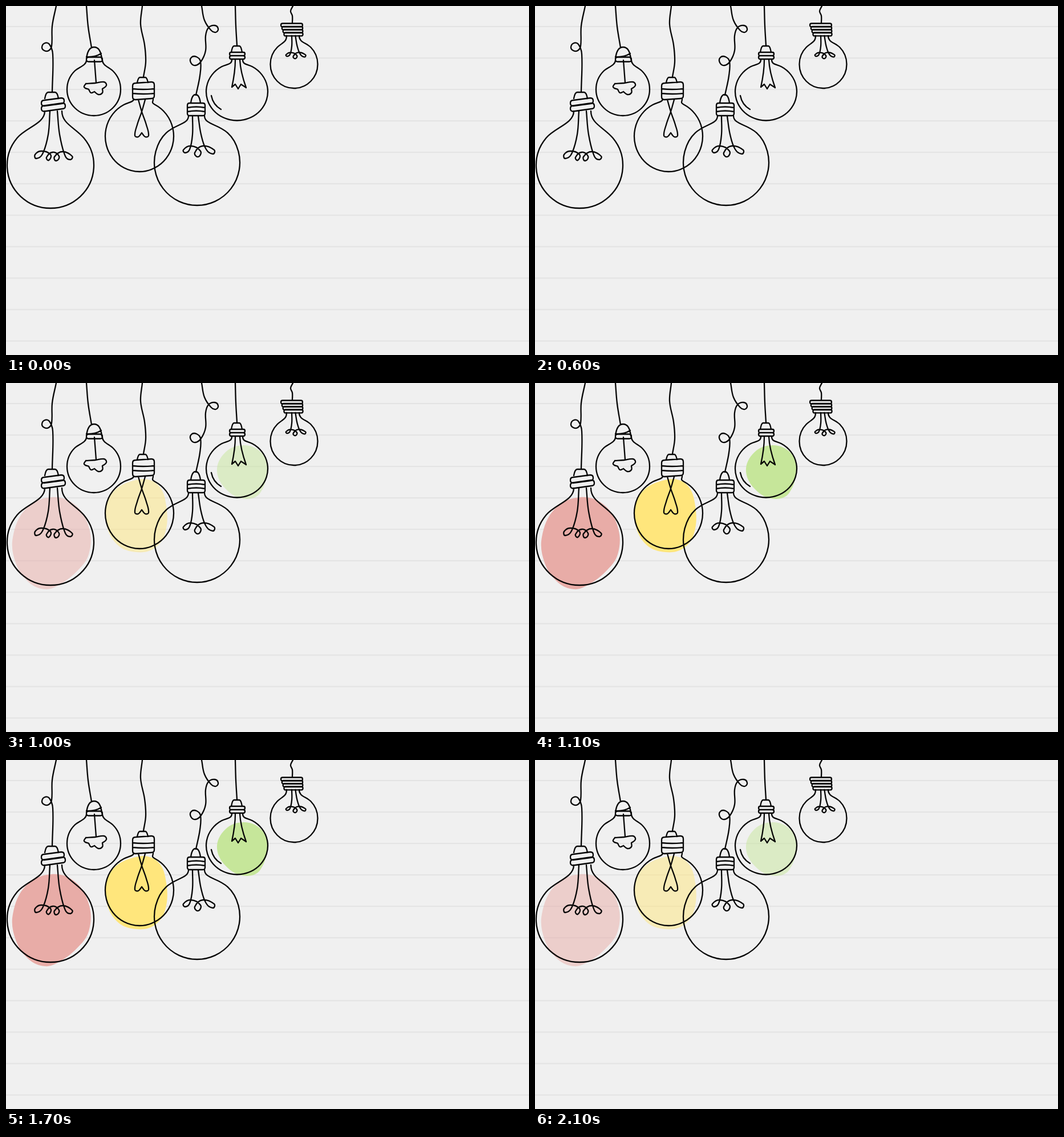
Write an HTML page that moves like this. It is 917x611 px and loops after 2200 ms.

```html
<!DOCTYPE html>
<html lang="en">
<head>
<meta charset="utf-8">
<title>Light bulbs</title>
<style>
  html, body { margin: 0; width: 100%; height: 100%; overflow: hidden; background: #f0f0f0; }
  svg { display: block; width: 100%; height: 100%; }
  #ink { fill: none; stroke: #050505; stroke-width: 2.3; stroke-linecap: round; stroke-linejoin: round; }
  #glow { opacity: 0; animation: glow 2200ms step-end infinite; }
  @keyframes glow {
    0% { opacity: 0; }
    45.4545% { opacity: .5; }
    50% { opacity: 1; }
    95.4545% { opacity: .5; }
    100% { opacity: 0; }
  }
</style>
</head>
<body>
<svg viewBox="0 0 917 611">
  <defs>
    <pattern id="rules" y="35" width="917" height="55.05" patternUnits="userSpaceOnUse">
      <rect width="917" height="2" fill="#e3e3e3"/>
    </pattern>
  </defs>
  <rect width="917" height="611" fill="url(#rules)"/>
  <g id="glow">
    <path id="pink" fill="#e8aca7"/>
    <path id="yellow" fill="#ffe67c"/>
    <path id="green" fill="#c6e69a"/>
  </g>
  <path id="ink"/>
</svg>
<script>
const strokes = [];
const draw = d => strokes.push(d);
const setPath = (id, d) => document.getElementById(id).setAttribute('d', d);

// Smooth curve through flat x, y pairs; handles scale with each segment.
function smooth(coords, closed = false) {
  const pts = [];
  for (let i = 0; i < coords.length; i += 2) pts.push([coords[i], coords[i + 1]]);
  const n = pts.length;
  const at = i => closed ? pts[(i + n) % n] : pts[Math.max(0, Math.min(n - 1, i))];
  const tangent = i => {
    const [a, b] = [at(i - 1), at(i + 1)];
    const len = Math.hypot(b[0] - a[0], b[1] - a[1]) || 1;
    return [(b[0] - a[0]) / len, (b[1] - a[1]) / len];
  };
  let d = `M${pts[0]}`;
  for (let i = 0; i < (closed ? n : n - 1); i++) {
    const p = at(i), q = at(i + 1), t = tangent(i), u = tangent(i + 1);
    const k = Math.hypot(q[0] - p[0], q[1] - p[1]) * .36;
    d += `C${p[0] + t[0] * k},${p[1] + t[1] * k} ${q[0] - u[0] * k},${q[1] - u[1] * k} ${q}`;
  }
  return d;
}
const curve = (...coords) => draw(smooth(coords));

// Elliptical glass, open between its shoulders, flowing into the neck.
function glass({ cx, cy, rx, ry, left, right, top, shoulder, reach, drop }) {
  const a = shoulder * Math.PI / 180;
  const dx = rx * Math.sin(a), y = cy - ry * Math.cos(a);
  const tx = rx * Math.cos(a), ty = ry * Math.sin(a), k = reach / Math.hypot(tx, ty);
  draw(`M${left},${top}C${left},${top + drop} ${cx - dx + tx * k},${y - ty * k} ${cx - dx},${y}` +
    `A${rx},${ry} 0 1 0 ${cx + dx},${y}` +
    `C${cx + dx - tx * k},${y - ty * k} ${right},${top + drop} ${right},${top}`);
}

// Rounded cap ring whose right end is raised by rise.
function ring(x, y, w, h, r, rise = 0) {
  const run = w - 2 * r, side = h - 2 * r;
  draw(`M${x + r},${y}l${run},${-rise}q${r},0 ${r},${r}v${side}q0,${r} ${-r},${r}` +
    `l${-run},${rise}q${-r},0 ${-r},${-r}v${-side}q0,${-r} ${r},${-r}z`);
}

function dome(x1, x2, base, top, round) {
  const c = (x2 - x1) * round;
  draw(`M${x1},${base}Q${x1 + 2},${top} ${x1 + c},${top}H${x2 - c}Q${x2 - 2},${top} ${x2},${base}`);
}

const arch = (x1, x2, y, bend) => draw(`M${x1},${y}Q${(x1 + x2) / 2},${y + bend} ${x2},${y}`);

// Large bulb on the left
curve(88,0, 81,35, 80,70, 75,78, 67,78, 63,72, 68,65, 76,67, 82,84, 81,151);
dome(68, 92, 162, 151, .25);
ring(62, 165, 40, 10, 5, 4);
ring(62, 174.5, 42, 10, 5, 4.5);
glass({ cx: 78, cy: 279, rx: 76, ry: 75, left: 68, right: 98, top: 184, shoulder: 50, reach: 24, drop: 22 });
curve(77,184, 74,225, 64,259, 53,267, 51,260, 62,254, 78,260, 75,270, 71,265, 82,256,
  93,263, 88,271, 85,264, 99,255, 116,263, 113,269, 104,263, 94,225, 90,184);

// Bulb with a flower
curve(141,0, 144,36, 150,73);
dome(141, 168, 93, 72, .5);
draw('M141,89Q156,90 167,83');
ring(141, 89.5, 28, 8, 4);
glass({ cx: 154, cy: 146, rx: 47, ry: 46, left: 141, right: 169, top: 95, shoulder: 45, reach: 9, drop: 9 });
draw('M155,95L158,134');
curve(140,136, 156,135, 172,133, 176,139, 169,145);
curve(169,145, 169,152, 162,155, 155,150);
curve(155,150, 149,152, 145,146);
curve(145,146, 137,142, 140,136);

// Bulb with a heart
curve(239,0, 236,32, 243,68, 245,98, 241,124);
dome(230, 249, 134, 125, .25);
ring(222, 135, 38, 29, 5, 2);
arch(222, 259, 145, 2);
arch(222, 260, 153, 2);
glass({ cx: 234, cy: 228, rx: 60, ry: 62, left: 224, right: 258, top: 163, shoulder: 27, reach: 8, drop: 5 });
const heartHalf = [232,164, 238,185, 246,208, 250,227, 244,229, 238,222];
curve(...heartHalf);
curve(...heartHalf.map((v, i) => i % 2 ? v : 476 - v));

// Bulb on the curly cord
curve(343,0, 348,25, 360,43, 368,46, 372,40, 366,34, 355,38, 350,52, 350,78,
  342,97, 332,104, 324,99, 325,90, 334,89, 341,97, 340,122, 333,156);
dome(324, 341, 170, 155, .5);
ring(318, 170, 31, 22, 4);
arch(318, 349, 178, -3);
arch(318, 349, 185, -3);
glass({ cx: 335, cy: 274, rx: 75, ry: 75, left: 320, right: 348, top: 192, shoulder: 75, reach: 55, drop: 22 });
const coil = [327,193, 327,225, 322,251, 314,257, 311,252, 324,245, 341,254, 337,264,
  331,257, 345,245, 365,252, 363,259, 351,251, 342,225, 337,193];
curve(...coil);

// Bulb with a ribbon
curve(402,0, 403,35, 405,69);
dome(395, 414, 81, 70, .25);
ring(392, 81, 27, 6, 3);
ring(392, 87, 27, 6, 3);
glass({ cx: 405, cy: 150, rx: 54, ry: 50.5, left: 396, right: 415, top: 94, shoulder: 30, reach: 10, drop: 9 });
draw('M402,94Q402,115 396,142L402,137L407,145L412,137L421,143Q411,115 410,94');
draw('M360,157Q363,173 377,181');

// Small bulb on the right
curve(503,0, 499,9, 502,17, 502,30);
for (let i = 0; i < 4; i++) ring(482 + i * 1.8, 30.5 + i * 5.3, 38 - i * 1.6, 6, 3);
glass({ cx: 505, cy: 102, rx: 41.5, ry: 42, left: 492, right: 514, top: 52, shoulder: 45, reach: 12, drop: 12 });
curve(...coil.map((v, i) => i % 2 ? 52 + (v - 193) * .565 : 491 + (v - 311) * .63));

setPath('ink', strokes.join(''));
setPath('pink', smooth([80,200, 122,214, 146,255, 145,300, 124,330, 92,354, 68,361, 40,349, 17,315, 12,270, 35,220], true));
setPath('yellow', smooth([232,169, 266,178, 281,215, 279,263, 259,290, 228,296, 195,283, 176,245, 184,195], true));
setPath('green', smooth([418,109, 448,122, 458,150, 446,192, 422,203, 390,190, 370,155, 385,121], true));
</script>
</body>
</html>
```
